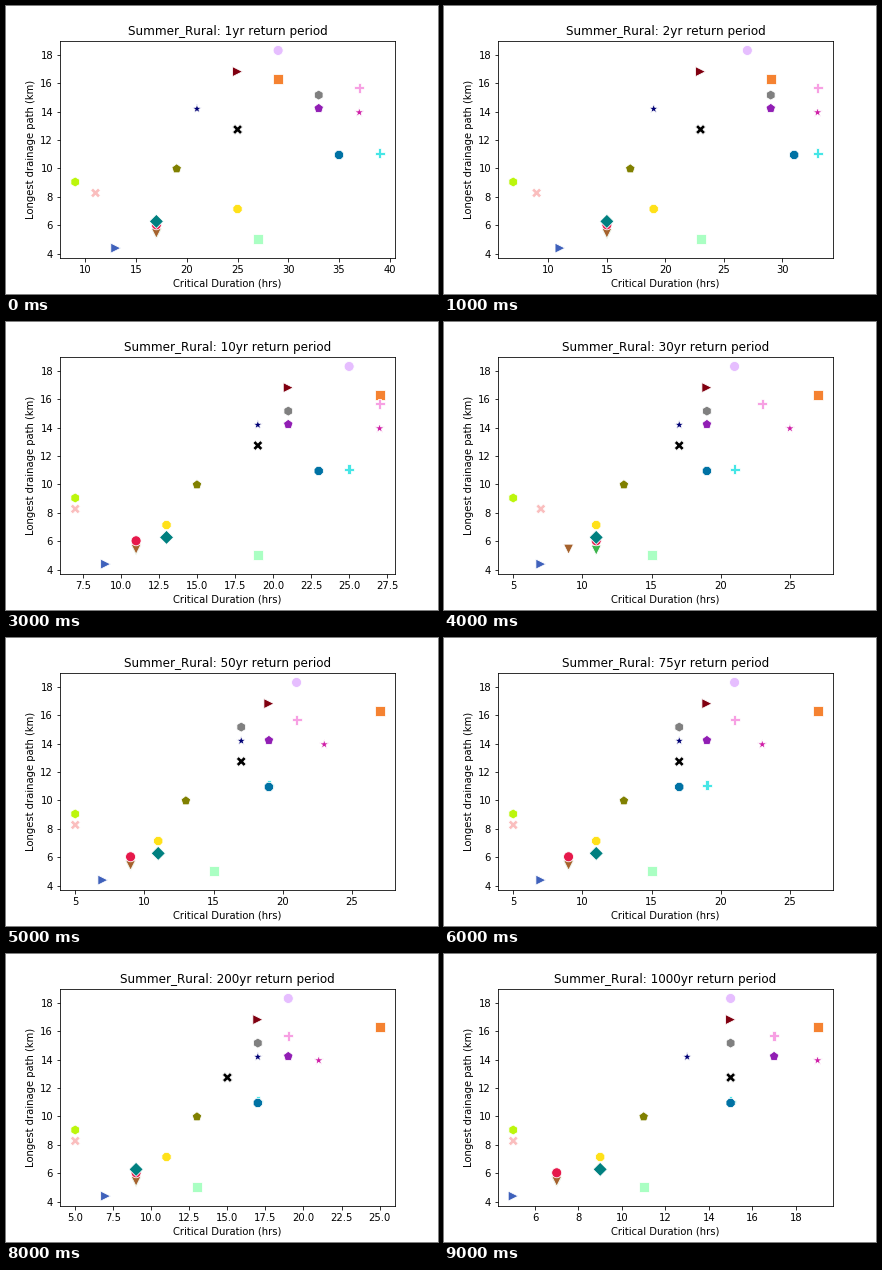
Write a matplotlib script that moves like this. It is 432x288 px and loops after 10 s.

```python
import numpy as np
import matplotlib.pyplot as plt
from matplotlib.animation import FuncAnimation
from matplotlib.markers import MarkerStyle

plt.rcParams["font.family"] = "DejaVu Sans"
plt.rcParams["text.kerning_factor"] = 6

PERIODS = [1, 2, 5, 10, 30, 50, 75, 100, 200, 1000]
sites = []


def site(marker, color, path_km, first, last, bend=2.0):
    """One catchment: path length, hours at 1yr and 1000yr, bend between."""
    style = MarkerStyle(marker)
    shape = style.get_path().transformed(style.get_transform())
    sites.append((shape, color, path_km, first, last, bend))


site("v", "#3cb44b", 5.38, 17, 7.9)
site("v", "#a5622d", 5.45, 17, 7.5)
site("o", "#e6194b", 6.04, 17, 7.9)
site("D", "#008080", 6.28, 16.4, 9.4)
site("8", "#ffe119", 7.15, 24.1, 9.99, 3.3)
site(">", "#3f61bb", 4.40, 12.1, 5.9)
site("s", "#f58231", 16.29, 29, 19.99, 0.4)
site("p", "#911eb4", 14.23, 32, 17.9, 3.1)
site("P", "#46e6e6", 11.07, 38, 15.9, 2.3)
site("*", "#d020a8", 13.94, 36.4, 19.9, 1.8)
site("h", "#bcf60c", 9.05, 8.1, 4.5)
site("X", "#fabebe", 8.28, 10, 5.2, 2.5)
site("o", "#e6beff", 18.30, 28.6, 15.99, 1.1)
site("8", "#0072a4", 10.95, 35.9, 15.99, 2.4)
site(">", "#800010", 16.81, 24, 15.99, 1.4)
site("s", "#aaffc3", 5.04, 26.5, 11.99)
site("p", "#808000", 9.98, 18, 11.9)
site("P", "#f7a0e3", 15.68, 36, 17.9, 1.8)
site("*", "#000075", 14.19, 20, 13.9, 0.6)
site("h", "#808080", 15.16, 32, 15.9, 2.5)
site("X", "#000000", 12.74, 24, 15.5, 2.5)

shapes, colors, *columns = zip(*sites)
path_km, first, last, bend = map(np.array, columns)

fig = plt.figure(figsize=(6, 4), dpi=72, facecolor="white")
ax = fig.add_axes([0.125, 0.125, 0.775, 0.755])


def durations(period):
    """Critical durations shrink with rarity, in odd whole hours."""
    left = 1 - np.log10(period) / 3
    hours = last + (first - last) * left ** bend
    return 2 * np.floor(hours / 2) + 1


def padded(values, margin=0.05):
    lo, hi = values.min(), values.max()
    pad = margin * (hi - lo)
    return lo - pad, hi + pad


def draw(i):
    ax.clear()
    hours = durations(PERIODS[i])
    dots = ax.scatter(hours, path_km, s=100, c=colors,
                      edgecolors="white", linewidths=0.8)
    dots.set_paths(shapes)
    ax.set_xlim(padded(hours))
    ax.set_ylim(padded(path_km))
    ax.set_title(f"Summer_Rural: {PERIODS[i]}yr return period")
    ax.set_xlabel("Critical Duration (hrs)")
    ax.set_ylabel("Longest drainage path (km)")
    return []


anim = FuncAnimation(fig, draw, frames=len(PERIODS), interval=1000,
                     init_func=lambda: draw(0), repeat=True, repeat_delay=0)
plt.show()
```
